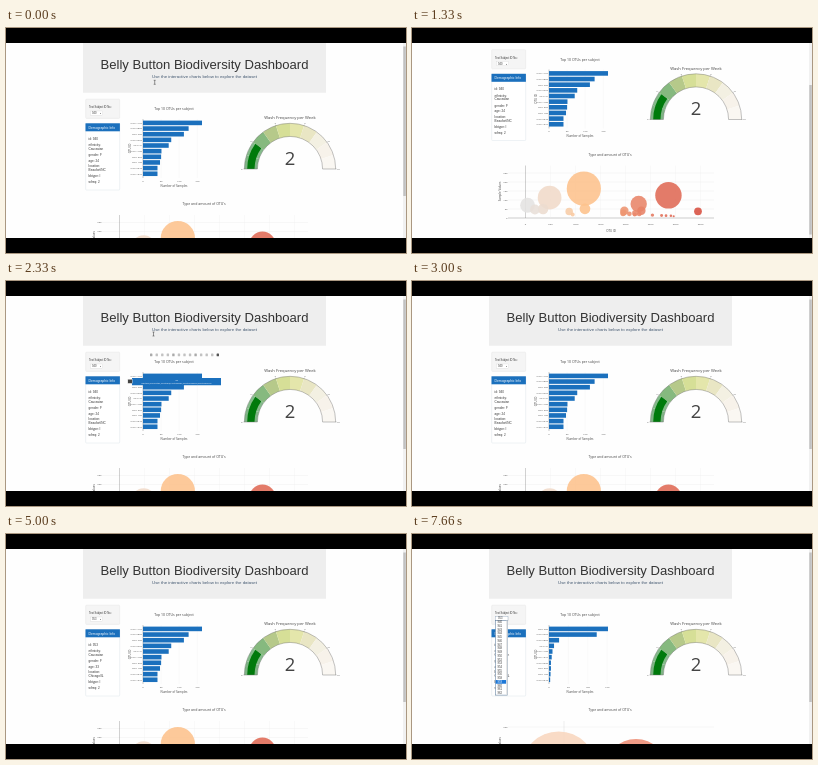
An HTML page that plays this animation: 400x225 px, repeating every 8 s.

```html
<!DOCTYPE html>
<html lang="en">
<head>
<meta charset="utf-8">
<title>Biodiversity Dashboard</title>
<style>
html, body { margin: 0; width: 100%; height: 100%; overflow: hidden; background: #000; }
svg { display: block; width: 100vw; height: 100vh; }
text { font-family: "Liberation Sans", Arial, sans-serif; fill: #333; }
.plot text { font-family: "Open Sans", sans-serif; fill: #444; }
</style>
</head>
<body>
<svg id="stage" viewBox="0 0 400 225"></svg>
<script>
const NS = 'http://www.w3.org/2000/svg';
const LOOP = 8000, SCROLL = 49.5;
const BLUE = '#1b70bd';
const stage = document.getElementById('stage');

function el(parent, tag, attrs = {}) {
  const node = document.createElementNS(NS, tag);
  for (const key in attrs) node.setAttribute(key, attrs[key]);
  parent.appendChild(node);
  return node;
}
const group = (parent, attrs) => el(parent, 'g', attrs);
const rect = (parent, x, y, width, height, fill, more) =>
  el(parent, 'rect', { x, y, width, height, fill, ...more });
const line = (parent, x1, y1, x2, y2, stroke, w = 0.3) =>
  el(parent, 'line', { x1, y1, x2, y2, stroke, 'stroke-width': w });
function text(parent, x, y, size, str, more) {
  const node = el(parent, 'text', { x, y, 'font-size': size, ...more });
  node.textContent = str;
  return node;
}
const MID = { 'text-anchor': 'middle' }, END = { 'text-anchor': 'end' };

rect(stage, 0, 15, 400, 195, '#fefefe');
const page = group(stage);

// Header
rect(page, 77, 0, 243, 64.7, '#eeeeee');
text(page, 198.5, 41, 13.08, 'Belly Button Biodiversity Dashboard', MID);
text(page, 198.5, 50.2, 4.36, 'Use the interactive charts below to explore the dataset',
  { ...MID, style: 'fill:#40566f' });

// Side column
rect(page, 79.7, 71.2, 34, 19.2, '#f5f5f5', { stroke: '#e0e0e0', 'stroke-width': 0.4, rx: 0.8 });
text(page, 83, 80, 2.6, 'Test Subject ID No.:');
rect(page, 84.5, 83, 12, 4.2, '#fff', { stroke: '#ccc', 'stroke-width': 0.25 });
rect(page, 79.7, 95.5, 34, 66.5, '#fff', { stroke: '#d3dde6', 'stroke-width': 0.4, rx: 0.8 });
rect(page, 79.5, 95.3, 34.4, 8, BLUE);
text(page, 82.6, 100.6, 3.35, 'Demographic Info', { style: 'fill:#fff' });

function subject(id, age, place) {
  const g = group(page);
  text(g, 86, 86.2, 2.6, id);
  text(g, 94, 86, 2, '▾');
  const rows = [[111.6, 'id: ' + id], [118, 'ethnicity:'], [121.7, 'Caucasian'],
    [128.2, 'gender: F'], [133.6, 'age: ' + age], [139.2, 'location:'],
    [143.1, place], [149.3, 'bbtype: I'], [155.2, 'wfreq: 2']];
  for (const [y, str] of rows) text(g, 82.6, y, 3.1, str);
  return g;
}
const people = [subject(940, 24, 'Beaufort/NC'), subject(953, 33, 'Chicago/IL')];

// Bar chart
const plots = group(page, { class: 'plot' });
text(plots, 168, 82, 3.5, 'Top 10 OTUs per subject', MID);
text(plots, 168, 158.8, 2.9, 'Number of Samples', MID);
text(plots, 0, 0, 2.9, 'OTU ID', { ...MID, transform: 'translate(125 120.5) rotate(-90)' });

function bars(values, ids, unit) {
  const g = group(plots);
  for (let i = 0; i < 4; i++) {
    const x = 137 + i * 50 * unit;
    line(g, x, 91, x, 150, i ? '#eee' : '#444');
    text(g, x, 153.8, 2.5, i * 50, MID);
  }
  values.forEach((v, i) => {
    const y = 94.9 + i * 5.65;
    rect(g, 137, y - 2.3, v * unit, 4.6, BLUE);
    text(g, 136, y + 0.9, 2.5, 'OTU ' + ids[i], END);
  });
  return g;
}
const barSets = [
  bars([163, 126, 113, 78, 71, 51, 50, 47, 40, 40],
    [1167, 2859, 482, 2264, 41, 1189, 352, 189, 2318, 1977], 0.362),
  bars([152, 123, 26, 13, 9, 7, 5, 5, 4, 3],
    [482, 2264, 2859, 41, 1189, 1977, 2039, 352, 189, 2318], 0.388)
];

// Gauge
const CX = 284, CY = 141;
function polar(r, part) {
  const a = Math.PI * (1 - part);
  return (CX + r * Math.cos(a)).toFixed(2) + ' ' + (CY - r * Math.sin(a)).toFixed(2);
}
function arc(r0, r1, from, to, fill, more) {
  el(plots, 'path', { fill, ...more, d:
    `M${polar(r1, from)}A${r1} ${r1} 0 0 1 ${polar(r1, to)}` +
    `L${polar(r0, to)}A${r0} ${r0} 0 0 0 ${polar(r0, from)}Z` });
}
['#7fb485', '#84bb8a', '#86b97f', '#b6c98a', '#d6df97', '#e4e6ab',
  '#e9e6c4', '#f3f0e2', '#f7f2ea', '#faf7f2'].forEach((c, i) =>
  arc(32.6, 45.7, i / 10, (i + 1) / 10, c));
arc(35.5, 42.8, 0, 0.2, '#007a0c');
arc(32.6, 45.7, 0, 1, 'none', { stroke: '#777', 'stroke-width': 0.45 });
for (let i = 0; i <= 5; i++) {
  const [x, y] = polar(47.6, i / 5).split(' ').map(Number);
  el(plots, 'path', { d: `M${polar(45.5, i / 5)}L${polar(46.5, i / 5)}`, stroke: '#444', 'stroke-width': 0.3 });
  text(plots, x + (i - 2.5) * 0.3, y + 0.7, 2.5, i * 2, MID);
}
text(plots, CX, 91, 4.2, 'Wash Frequency per Week', MID);
text(plots, CX, 136.8, 18.5, '2', MID);

// Bubble chart
const STOPS = [[0, 227, 227, 227], [482, 240, 218, 200], [1167, 253, 194, 140],
  [2264, 232, 132, 104], [3500, 214, 76, 62]];
function tint(id) {
  const k = STOPS.findIndex(s => s[0] >= id), a = STOPS[k - 1], b = STOPS[k];
  const p = (id - a[0]) / (b[0] - a[0]);
  return `rgb(${[1, 2, 3].map(i => Math.round(a[i] + (b[i] - a[i]) * p))})`;
}
text(plots, 198, 177.4, 3.5, "Type and amount of OTU's", MID);
text(plots, 199, 253, 2.9, 'OTU ID', MID);
text(plots, 0, 0, 2.9, 'Sample Values', { ...MID, transform: 'translate(88.5 213) rotate(-90)' });

const first = group(plots), second = group(plots);
const BASE = 239.5;
for (let i = 0; i <= 5; i++) {
  const y = BASE - i * 9;
  line(first, 96, y, 302, y, i ? '#e2e2e2' : '#555');
  text(first, 95.5, y + 0.9, 2.5, i * 50, END);
}
for (let i = 0; i <= 7; i++) {
  const x = 113.5 + i * 25;
  line(first, x, 187, x, BASE, i ? '#ededed' : '#666');
  text(first, x, 246, 2.5, i * 500, MID);
}
[[1167, 163], [2859, 126], [482, 113], [2264, 78], [41, 71], [1189, 51], [352, 50],
  [189, 47], [2318, 40], [1977, 40], [3450, 37], [874, 36], [1959, 30], [2191, 28],
  [1950, 25], [2077, 23], [2275, 22], [944, 19], [2184, 19], [2539, 16], [2722, 14],
  [2811, 13], [2908, 12], [2964, 10]].forEach(([id, v]) =>
  el(first, 'circle', { cx: 113.5 + id / 20, cy: BASE - v * 0.18, r: v * 0.105,
    fill: tint(id), opacity: 0.88 }));

line(second, 96, 193, 302, 193, '#e2e2e2');
text(second, 95.5, 193.9, 2.5, 200, END);
line(second, 152, 187, 152, BASE, '#c4c4c4');
[[146.7, 235, 37.5, '#f9dac3'], [224, 236, 31, '#ef9680']].forEach(([cx, cy, r, fill]) =>
  el(second, 'circle', { cx, cy, r, fill, opacity: 0.95 }));

// Chart toolbar and hover label
const hover = group(page, { class: 'plot' });
for (let i = 0; i < 13; i++)
  rect(hover, 144 + i * 5.55, 72.6, 2.4, 2.6, i === 12 ? '#555' : i % 4 ? '#c2c2c2' : '#aaa', { rx: 0.5 });
el(hover, 'path', { d: 'M122.5 100.5L126 98.6V97H215V104.3H126V102.4Z', fill: BLUE });
rect(hover, 121.8, 98.2, 4.4, 4.2, '#444', { stroke: '#fff', 'stroke-width': 0.4 });
text(hover, 170.5, 99.8, 2.1, '126', { ...MID, style: 'fill:#fff' });
text(hover, 170.5, 102.9, 2.1,
  'Bacteria;Firmicutes;Clostridia;Clostridiales;IncertaeSedisXI;Peptoniphilus',
  { ...MID, style: 'fill:#fff' });

// Drop-down list
const list = group(page);
rect(list, 83.4, 82.2, 12.6, 4, '#fff', { stroke: '#8fa3b8', 'stroke-width': 0.4 });
text(list, 86, 85.3, 2.6, '');
const choice = list.lastChild;
rect(list, 83.4, 86.3, 12.3, 74.8, '#fff', { stroke: '#4d6f91', 'stroke-width': 0.5 });
const mark = rect(list, 83.7, 86.5, 10.6, 3.7, '#1e78d7');
rect(list, 94.3, 86.5, 1.2, 74.4, '#ddd');
const options = [];
for (let id = 940; options.length < 20; id++) {
  if ([942, 951, 957].includes(id)) continue;
  options.push(text(list, 85.4, 89.3 + options.length * 3.72, 2.7, id));
}

// Mouse
const beam = el(page, 'path', { d: 'M-1 -2H1M0 -2V2M-1 2H1', stroke: '#333', 'stroke-width': 0.5, fill: 'none' });
const arrow = el(page, 'path', { d: 'M91.6 91.5V95L92.4 94.3L93.7 94.2Z', fill: '#fff', stroke: '#222', 'stroke-width': 0.4 });

// Window frame
rect(stage, 397, 15, 3, 195, '#f1f1f1');
const thumb = rect(stage, 397.3, 18.5, 2.5, 149.5, '#c1c1c1');
rect(stage, 0, 0, 400, 15, '#000');
rect(stage, 0, 210, 400, 15, '#000');

const show = (node, on) => node.setAttribute('display', on ? 'inline' : 'none');
// Highlighted option from each time on; -1 means closed.
const MENU = [[0, -1], [3660, 0], [4000, 6], [4330, 11], [4660, -1], [7330, 11], [7660, 16], [LOOP, -1]];

function draw(t) {
  const within = (a, b) => t >= a && t < b;
  const down = within(1330, 2330);
  page.setAttribute('transform', `translate(0 ${down ? -SCROLL : 0})`);
  thumb.setAttribute('y', down ? 57 : 18.5);

  const picked = t >= 4660, redrawn = t >= 5330;
  show(people[0], !picked);
  show(people[1], picked);
  show(barSets[0], !redrawn);
  show(barSets[1], redrawn);
  show(first, !redrawn);
  show(second, redrawn);
  show(hover, within(2330, 2660));

  const item = MENU.filter(m => m[0] <= t).pop()[1];
  show(list, item >= 0);
  choice.textContent = picked ? 953 : 940;
  mark.setAttribute('y', 86.5 + Math.max(item, 0) * 3.72);
  options.forEach((o, i) => { o.style.fill = i === item ? '#fff' : '#333'; });

  show(beam, t < 330 || within(2330, 2660));
  beam.setAttribute('transform', t < 330 ? 'translate(148.7 54.3)' : 'translate(147.5 53)');
  show(arrow, within(6330, 6660));
}
function tick() {
  draw(performance.now() % LOOP);
  requestAnimationFrame(tick);
}
tick();
</script>
</body>
</html>
```
